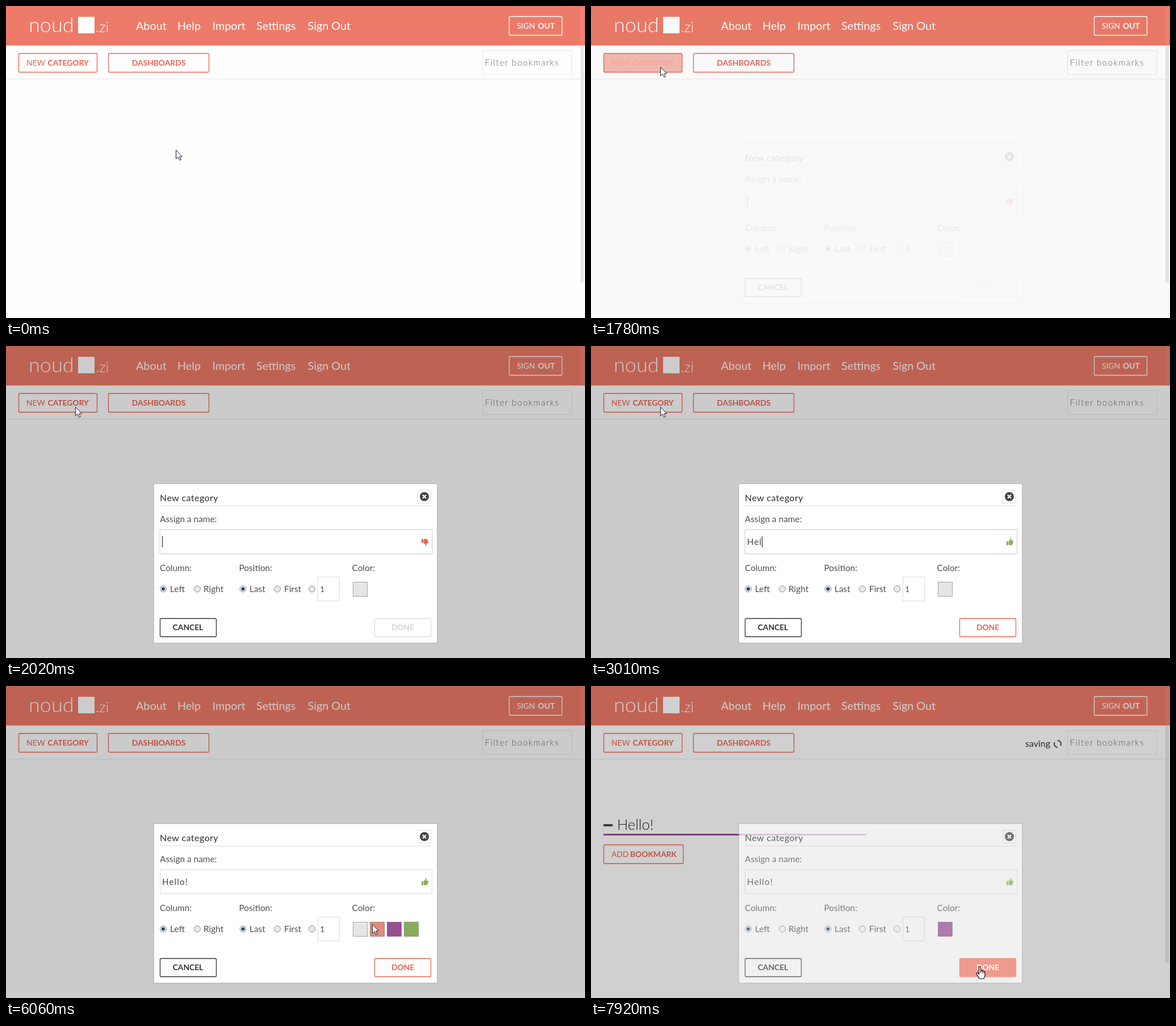
Animation of 1020x549 px, one loop 8000 ms. Source, as an HTML page:

```html
<!DOCTYPE html>
<html lang="en">
<head>
<meta charset="utf-8">
<title>New category</title>
<style>
html, body { margin: 0; width: 100%; height: 100%; overflow: hidden; background: #fefefe; }
svg { display: block; width: 1020px; height: 549px; }
text { font-family: Lato, "Open Sans", sans-serif; white-space: pre; }
</style>
</head>
<body>
<svg id="stage" viewBox="0 0 1020 549"></svg>
<script>
const CORAL = '#eb6451', HEADER = '#ed7a68', PURPLE = '#964f97', GREEN = '#89ae5a', GREY = '#e5e5e5';
const HAIRLINE = 'rgba(0,0,0,.14)', LOOP = 8000;

// --- markup helpers
const text = (x, y, s, size, fill, weight = 400, extra = '') =>
  `<text x="${x}" y="${y}" font-size="${size}" fill="${fill}" font-weight="${weight}" ${extra}>${s}</text>`;
const rect = (x, y, w, h, fill, extra = '') =>
  `<rect x="${x}" y="${y}" width="${w}" height="${h}" fill="${fill}" ${extra}/>`;
const frame = (x, y, w, h, stroke, extra = '') =>
  rect(x + .5, y + .5, w - 1, h - 1, 'none', `stroke="${stroke}" ${extra}`);
const group = (id, body) => `<g id="${id}">${body}</g>`;
const line = (d, stroke, width = 1) => `<path d="${d}" fill="none" stroke="${stroke}" stroke-width="${width}"/>`;
const border = (x, y, w, h, colour) => frame(x, y, w, h, colour, 'rx="2" stroke-width="1.3"');
const twoWords = (x1, a, x2, b, y, fill) => text(x1, y, a, 13.8, fill) + text(x2, y, b, 13.8, fill, 700);
const centred = (x, y, s, fill) => text(x, y, s, 13.8, fill, 700, 'text-anchor="middle"');

const radio = (x, on) =>
  `<circle cx="${x}" cy="427.5" r="5.5" fill="#e9e9e9" stroke="#8c8c8c"/>` +
  (on ? `<circle cx="${x}" cy="427.5" r="3" fill="#1f4a63"/>` : '');
const swatch = (x, fill, extra = '') =>
  rect(x + .5, 415.5, 25, 25, fill, `stroke="#000" stroke-opacity=".32" ${extra}`);
const thumb = (id, place, fill) =>
  group(id, `<path fill="${fill}" transform="${place}" d="M0 5.5h3v7H0zM3.8 5.5L6.5 3L7 0C8.8 0 9 1.5 8.4 4.5H11
  C12.4 4.8 12 6.2 11.6 7C12 8 11.6 9 11 9.4C11 10.6 10.6 11.2 10 11.4C9.8 12.4 9 12.5 8 12.5H5.5L3.8 11.8Z"/>`);

// --- page
const logo = text(40, 46, 'noud', 36, '#fff', 300) +
  rect(127, 19, 29, 29, '#fff') + text(158, 46, '.zi', 26, '#fff', 300);
const nav = [[229, 'About'], [302, 'Help'], [363.5, 'Import'], [441, 'Settings'], [531.5, 'Sign Out']]
  .map(([x, s]) => text(x, 42, s, 19.8, '#fff')).join('');
const newLabel = fill => twoWords(36, 'NEW', 73.5, 'CATEGORY', 105, fill);

const page =
  rect(0, 0, 1020, 549, '#fefefe') + rect(0, 0, 1020, 69.5, HEADER) + logo + nav +
  border(886, 18, 94, 34, '#fff') + twoWords(900, 'SIGN', 937, 'OUT', 40, '#fff') +
  rect(0, 128, 1020, 1, '#e6e6e6') +
  rect(22, 83, 139, 34, HEADER, 'id="newFill" rx="2"') +
  border(22, 83, 139, 34, CORAL) + newLabel(CORAL) + group('newText', newLabel('#fff')) +
  border(180, 83, 178, 34, CORAL) + centred(269, 105, 'DASHBOARDS', CORAL) +
  frame(839, 78, 158, 43, GREY) +
  text(843.5, 105, 'Filter bookmarks', 15, '#666', 300, 'letter-spacing="1.5"') +
  rect(1012, 2, 6, 68, '#fff', 'opacity=".07"') + rect(1012, 70, 6, 417, '#e8e8e8', 'id="bar"');

const category = group('category',
  rect(22, 243, 16, 4, '#4a4a4a') + text(46, 253, 'Hello!', 25.5, '#222', 300) +
  rect(22, 260, 463, 3, PURPLE) +
  border(22, 279, 141, 34, CORAL) + twoWords(36, 'ADD', 69, 'BOOKMARK', 301, CORAL) +
  text(765, 107, 'saving', 16, '#333') +
  group('spinner', line('M2 -5.7A6 6 0 0 1 4 4.5M-2 5.7A6 6 0 0 1 -4 -4.5', '#555', 2)));

// --- dialog
const panel = group('panel',
  frame(259, 241, 502, 283, 'rgba(0,0,0,.06)', 'rx="3"') +
  rect(260.5, 242.5, 499, 280, '#fff', `rx="1" stroke="${HAIRLINE}"`));
const labels = [[271, 310, 'Assign a name:'], [271, 396, 'Column:'], [410.5, 396, 'Position:'], [609.5, 396, 'Color:'],
  [289, 433, 'Left'], [348, 433, 'Right'], [429, 433, 'Last'], [490, 433, 'First']]
  .map(([x, y, s]) => text(x, y, s, 15.4, '#505050')).join('');
const palette = ['#e58a7c', PURPLE, GREEN].map((c, i) => swatch(641 + 30 * i, c)).join('');

const content = group('content',
  frame(259, 241, 502, 283, '#b0b0b0', 'rx="4" id="edge"') +
  text(271, 273, 'New category', 16, '#2c2c2c', 400, 'letter-spacing=".45"') +
  rect(271, 281, 478, 1, HAIRLINE) + frame(725, 253, 24, 24, HAIRLINE) +
  '<circle cx="737" cy="265" r="8" fill="#444"/>' + line('M734 262l6 6m0-6l-6 6', '#fff', 2.2) + labels +
  frame(271, 323, 480, 43, HAIRLINE) + frame(270, 322, 482, 45, 'rgba(0,0,0,.08)', 'rx="2" id="ring"') +
  text(275, 350, '', 15, '#444', 400, 'letter-spacing="1.2" id="typed"') + rect(275, 335, 1, 19, '#111', 'id="caret"') +
  thumb('bad', 'translate(732,352) scale(1,-1)', '#e56552') + thumb('good', 'translate(732,338)', GREEN) +
  radio(277, true) + radio(337) + radio(417.5, true) + radio(478) + radio(539) +
  frame(549, 406, 39, 43, HAIRLINE) + text(553.5, 433, '1', 13, '#444') +
  swatch(611, 'rgba(0,0,0,.1)', 'id="chosen"') + group('palette', palette) +
  border(271, 479, 100, 33, '#333') + centred(320.5, 500, 'CANCEL', '#333') +
  group('doneOff', border(649, 479, 100, 33, HAIRLINE) + centred(699, 500, 'DONE', 'rgba(0,0,0,.17)')) +
  group('doneOn', border(649, 479, 100, 33, CORAL) + centred(699, 500, 'DONE', CORAL)) +
  group('doneFill', rect(649, 479, 100, 33, HEADER, 'rx="2"') + centred(699, 500, 'DONE', '#fff')));

// --- pointers, tip at 0,0
const arrow = group('arrow', '<path d="M.5 .5V16L4.2 12.7L6.8 18.4L9.2 17.4L6.7 11.9H11.5Z" fill="#fff" stroke="#1b1b2b"/>');
const hand = group('hand', `<path d="M-1.5 14V2C-1.5 0 1.5 0 1.5 2V8C2 6.6 4.3 6.8 4.3 8.6C5 7.4 7 7.8 7 9.6
  C7.8 8.6 9 9.2 9 10.8V15C9 18 7.5 19 7.3 22H-1.2C-1.5 19.5 -4 17.5 -5.5 14C-6.5 11.6 -4 10.6 -1.5 14Z"
  fill="#fff" stroke="#111" stroke-width="1.2"/>` + line('M1.5 8v4M4.3 9v3.4M7 10v2.8', '#111'));

document.getElementById('stage').innerHTML =
  page + category + rect(0, 0, 1020, 549, '#000', 'id="shade"') +
  panel + content + group('pointer', arrow + hand);

// --- motion rules
const clamp = p => Math.min(1, Math.max(0, p));
const smooth = p => p * p * (3 - 2 * p);
const easeOut = p => Math.sin(p * Math.PI / 2);

// Progress 0..1 in n even jumps, the first at `from`, the last at `to`.
const jumps = (t, from, to, n) =>
  clamp((Math.floor((t + 15 - from) / (to - from) * (n - 1)) + 1) / n);

const moves = [
  { from: 600, to: 1330, n: 7, x: 122, y: 107 },
  { from: 4800, to: 5145, n: 4, x: 515, y: 318 },
  { from: 5260, to: 5490, n: 3, x: 624, y: 411 },
  { from: 6060, to: 6410, n: 4, x: 680, y: 431 },
  { from: 6870, to: 7430, n: 6, x: 685, y: 493 }
];
function pointerAt(t) {
  let x = 299, y = 253;
  for (const m of moves) {
    const p = easeOut(jumps(t, m.from, m.to, m.n));
    x += (m.x - x) * p;
    y += (m.y - y) * p;
  }
  return [Math.round(x), Math.round(y)];
}

const OPEN = 1680, KEY = 2450, KEY_GAP = 260, WORD = 'Hello!';
const BLINK = 1040, LIT = 560;

const $ = id => document.getElementById(id);
const fade = (id, v) => $(id).setAttribute('opacity', Number(v));

function drawDialog(t) {
  const open = smooth(clamp((jumps(t, 1660, 2020, 4) - .38) / .6));
  const closing = .27 * jumps(t, 7670, 7920, 3) ** 2;
  const solid = t >= 2010;
  fade('shade', .2 * (open - closing / 3));
  fade('content', open * (1 - closing));
  fade('panel', solid * (1 - 1.1 * closing));
  fade('edge', !solid);
  fade('bar', t < 1880 || t > 7780);
}

function drawTyping(t) {
  const n = Math.min(WORD.length, Math.max(0, Math.floor((t - KEY) / KEY_GAP) + 1));
  const since = n ? KEY + (n - 1) * KEY_GAP : OPEN;
  const typed = $('typed');
  typed.textContent = WORD.slice(0, n);
  $('caret').setAttribute('x', Math.round(275 + (n ? typed.getComputedTextLength() : 0)));
  fade('caret', t < 5620 && (t - since) % BLINK < LIT);
  fade('ring', t < 6060);
  fade('bad', n === 0);
  fade('good', n > 0);
  const ready = jumps(t, KEY, 3010, 5);
  fade('doneOn', ready);
  fade('doneOff', 1 - ready);
}

function drawPointer(t) {
  const hover = jumps(t, 1210, 1330, 2) - jumps(t, 1780, 1890, 2);
  const overDone = jumps(t, 7206, 7430, 3);
  const pointing = overDone > 0 || (t >= 1330 && t < 1660);
  fade('newFill', hover);
  fade('newText', hover);
  fade('doneFill', overDone);
  fade('hand', pointing);
  fade('arrow', !pointing);
  $('pointer').setAttribute('transform', `translate(${pointerAt(t)})`);
}

function draw(t) {
  drawDialog(t);
  drawTyping(t);
  drawPointer(t);
  const picked = t >= 6640;
  fade('palette', picked ? 0 : jumps(t, 5620, 5840, 3));
  $('chosen').setAttribute('fill', picked ? PURPLE : 'rgba(0,0,0,.1)');
  fade('category', t >= 7780);
  $('spinner').setAttribute('transform', `translate(822,102) rotate(${(t - 7920) * .4 - 20})`);
}

const start = performance.now();
function tick() {
  draw((performance.now() - start) % LOOP);
  requestAnimationFrame(tick);
}
tick();
</script>
</body>
</html>
```
